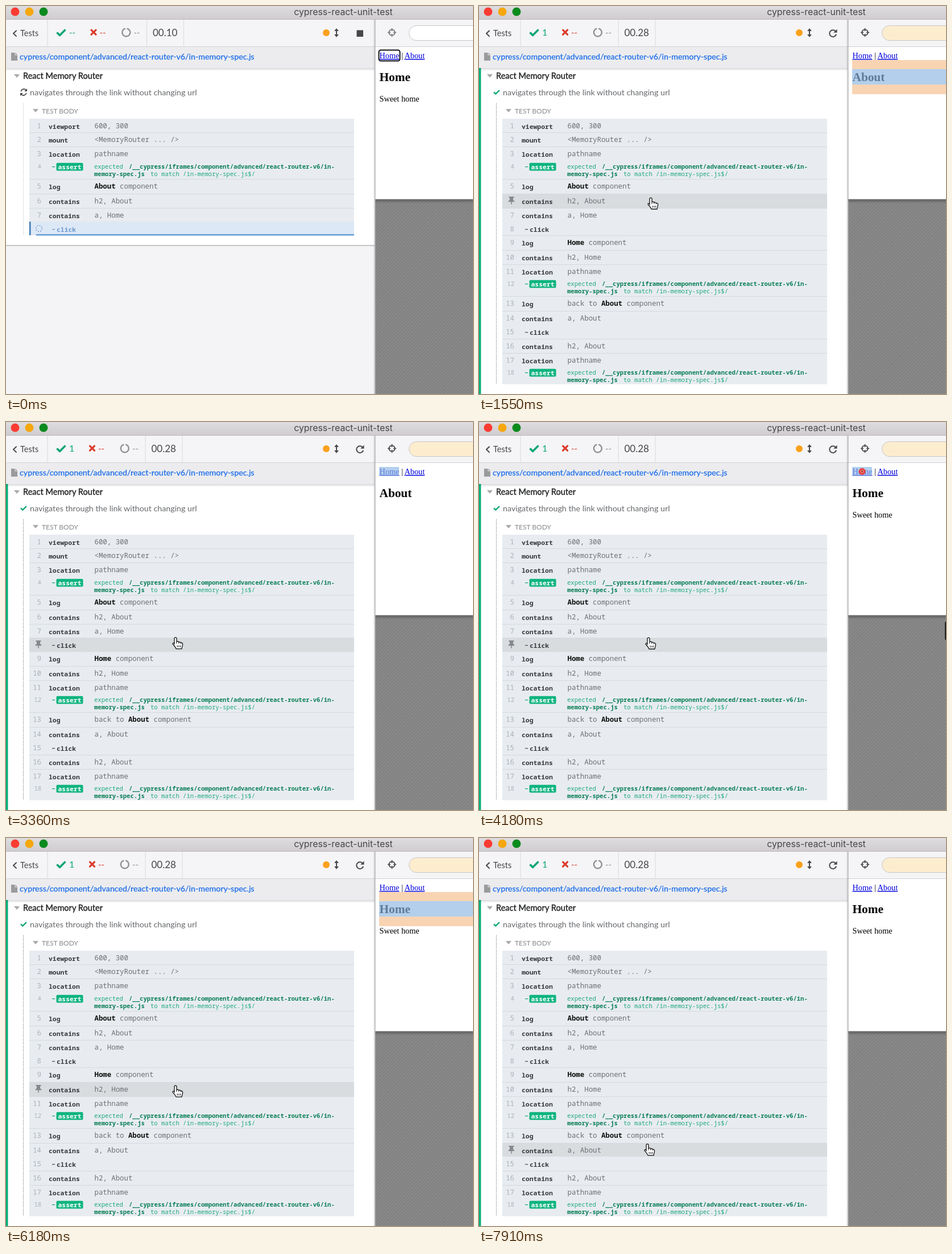
Recreate the animation shown at these times as an HTML page. Size 821 by 682 pixels, loop 8000 ms.

```html
<!DOCTYPE html>
<html lang="en">
<head>
<meta charset="utf-8">
<title>Test runner</title>
<style>
html, body { margin: 0; width: 100%; height: 100%; overflow: hidden; background: #f4f3f5; }
svg { display: block; width: 821px; height: 682px; }
text { white-space: pre; }
.ui { font: 14.25px Lato, sans-serif; }
.mono { font: 12.38px "Noto Sans Mono", "DejaVu Sans Mono", monospace; fill: #6d7074; }
.num { fill: #abb1b8; text-anchor: end; }
.name { font-size: 11.42px; font-weight: 600; fill: #35383c; }
.small { font-size: 10.58px; fill: #1fa97c; }
.strong { font-weight: 600; fill: #0b7f58; }
.key { font-weight: bold; fill: #111; }
.page { font: 14.25px "Liberation Serif", "Times New Roman", serif; fill: #000; }
.link { fill: #0000e0; text-decoration: underline; }
.h2 { font-size: 21.3px; font-weight: bold; }
.line { fill: none; stroke-linecap: round; stroke-linejoin: round; }
</style>
</head>
<body>
<svg viewBox="0 0 821 682">
  <defs>
    <linearGradient id="bar" x2="0" y2="1"><stop stop-color="#dedcde"/><stop offset="1" stop-color="#cfcdd0"/></linearGradient>
    <linearGradient id="fall" x2="0" y2="1"><stop stop-opacity=".28"/><stop offset="1" stop-opacity="0"/></linearGradient>
    <linearGradient id="side"><stop stop-opacity="0"/><stop offset="1" stop-opacity=".12"/></linearGradient>
    <pattern id="hatch" width="4.2" height="4.2" patternUnits="userSpaceOnUse" patternTransform="rotate(45)">
      <rect width="5" height="5" fill="#8a898a"/><rect width="1.6" height="5" fill="#807f80"/>
    </pattern>
  </defs>
  <g id="scene"></g>
  <g id="cursor" fill="#fff" stroke="#111" stroke-width="1.3" stroke-linejoin="round">
    <path d="M-2 2C-2-.6 2-.6 2 2V7.5C4 6.6 5.5 7.3 5.8 8.4C7.5 7.6 9 8.4 9.3 9.5C11 9 12.6 10 12.6 12C12.6 15 11.5 16 11 20H1C0 17-2.5 14.5-4.7 12C-5.8 10-3.5 9-2 11Z"/>
    <path d="M-2 11V13M2 7.5V11M5.8 8.4V11M9.3 9.5V11.5M3.2 14V17.5M6 14V17.5M8.7 14V17.5" fill="none" stroke-width="1"/>
  </g>
</svg>
<script>
const LOOP = 8000, STEP = LOOP / 88;
const GREEN = '#0ca673', RED = '#dc3a2c', DARK = '#45474b', GREY = '#929296';

// top edge, command, message; a leading "-" marks a child command
const rows = [
  [198, 'viewport', '600, 300'], [222, 'mount', '&lt;MemoryRouter ... /&gt;'],
  [247, 'location', 'pathname'], [272, '-assert'],
  [304, 'log', '*About* component'], [330, 'contains', 'h2, About'],
  [355, 'contains', 'a, Home'], [379, '-click'],
  [403, 'log', '*Home* component'], [429, 'contains', 'h2, Home'],
  [454, 'location', 'pathname'], [478, '-assert'],
  [510, 'log', 'back to *About* component'], [536, 'contains', 'a, About'],
  [560, '-click'], [585, 'contains', 'h2, About'],
  [610, 'location', 'pathname'], [634, '-assert'],
];
const END = 665;
const bottomOf = n => n < rows.length ? rows[n][0] : END;

// time, x, y of the fingertip
const path = [
  [620, 328, 690], [1100, 304, 340], [1550, 303, 338], [2250, 303, 341], [2500, 302, 360],
  [2730, 302, 361], [3100, 301, 364], [3280, 299, 379.5], [4180, 299, 380], [4900, 299, 383],
  [5270, 299, 426], [5360, 299, 434], [6500, 299, 437], [7180, 298, 453], [7819, 297, 528],
  [7910, 297, 539], [8000, 297, 545],
];

function pointer(t) {
  const i = path.findIndex(p => p[0] > t);
  if (i < 1) return null;
  const a = path[i - 1], b = path[i], k = (t - a[0]) / (b[0] - a[0]);
  return [a[1] + (b[1] - a[1]) * k, a[2] + (b[2] - a[2]) * k];
}

// number of the command under the pointer, 0 for none
function hoveredAt(t) {
  const p = pointer(t);
  return p && p[1] < END ? rows.filter(r => r[0] <= p[1]).length : 0;
}

const rect = (x, y, w, h, fill, more = '') =>
  `<rect x="${x}" y="${y}" width="${w}" height="${h}" fill="${fill}" ${more}/>`;
const circle = (x, y, r, fill, more = '') =>
  `<circle cx="${x}" cy="${y}" r="${r}" fill="${fill}" ${more}/>`;
const text = (x, y, cls, str, more = '') =>
  `<text x="${x}" y="${y}" class="${cls}" ${more}>${str}</text>`;
const line = (d, color, width, more = '') =>
  `<path class="line" d="${d}" stroke="${color}" stroke-width="${width}" ${more}/>`;
const fillPath = (d, color) => `<path d="${d}" fill="${color}"/>`;
const ui = (x, y, size, color, str, weight = 0) =>
  text(x, y, 'ui', str, `style="font-size:${size}px" fill="${color}" stroke="${color}" stroke-width="${weight}"`);
const tick = (x, y, s, w) => line(`M${x} ${y}l${4 * s} ${4 * s}l${8 * s} ${-8 * s}`, GREEN, w, 'style="stroke-linecap:butt"');

function windowFrame() {
  return rect(0, 0, 821, 682, '#f4f3f5') + rect(0, 0, 821, 23, 'url(#bar)') + rect(0, 23, 821, 1, '#b9b7ba') +
    circle(16, 10, 7.5, '#fa3c32') + circle(41, 10, 7.5, '#f5a70d') + circle(66, 10, 7.5, '#0b8a1e') +
    text(593, 16, '', 'cypress-react-unit-test',
      'text-anchor="middle" fill="#474549" style="font:15.8px Inter,sans-serif"');
}

function toolbar(s) {
  const dx = s.running ? 2.5 : 0;
  return rect(0, 24, 648, 47, '#f5f4f6') + line('M18 43.5l-5 4.8l5 4.8', DARK, 2) +
    ui(25, 53, 14.5, DARK, 'Tests') +
    [72.5, 244.5 + dx, 309.5 + dx].map(x => rect(x, 24, 1, 47, '#d9d8da')).join('') +
    tick(89.5, 46.5, 1.25, 3.6) + ui(111, 52, s.running ? 15 : 16, GREEN, s.running ? '--' : '1') +
    line(`M${147.5 + dx} 42.2l8 8m0-8l-8 8`, RED, 3.2) + ui(162 + dx, 52, 15, RED, '--') +
    line(`M${206.5 + dx} 39.9a7 7 0 1 0 4.6 0`, GREY, 2.3) + ui(222 + dx, 52, 15, GREY, '--') +
    ui(255.5 + dx, 52.5, 17, DARK, s.clock) +
    circle(563, 47, 6, '#fba11b') + line('M581 42v10', DARK, 2) +
    fillPath('M577 44l4-4.8l4 4.8zM577 50l4 4.8l4-4.8z', DARK) +
    (s.running ? rect(616.5, 42.5, 11.5, 11.5, DARK)
      : line('M627 44.5a6 6 0 1 0 .8 6', DARK, 2) + fillPath('M629.5 40.5v6.3h-6.3z', DARK));
}

function specBar() {
  return rect(0, 71, 648, 38, '#ececee') + rect(0, 71, 648, 1, '#d3d2d5') +
    rect(0, 109, 648, 5, 'url(#fall)', 'opacity=".55"') +
    fillPath('M9 82h6.5v4.5h4.5v9.5h-11zM16.5 82l3.5 3.5h-3.5z', '#9a9a9d') +
    ui(24, 94, 14.25, '#1f70ea', 'cypress/component/advanced/react-router-v6/in-memory-spec.js', .3);
}

function assertMessage(top) {
  return text(155, top + 13.5, 'mono small', 'expected') +
    text(216, top + 13.5, 'mono small strong', '/__cypress/iframes/component/advanced/react-router-v6/in-') +
    text(155, top + 27, 'mono small strong', 'memory-spec.js') +
    text(254, top + 27, 'mono small', 'to match /in-memory-spec.js$/');
}

function spinner(y, angle) {
  return `<g transform="translate(58 ${y}) rotate(${angle})">` +
    circle(0, 0, 5.3, 'none', 'stroke="#6f9bd3" stroke-width="1.7" stroke-dasharray="1.8 2.36"') + '</g>';
}

function command(i, s) {
  const [top, label, message] = rows[i], height = bottomOf(i + 1) - top;
  const child = label[0] === '-', name = label.replace('-', ''), isAssert = name === 'assert';
  const busy = s.running && i === s.count - 1, hovered = s.hover === i + 1;
  const base = top + 17.5, color = busy ? 'style="fill:#6b98d2"' : '';
  let out = rect(41, top, 571, height, busy ? '#dde8f6' : hovered ? '#d8dcdf' : '#e8ecf0');
  if (!child && i) out += rect(41, top, 571, 1, '#d5dade');
  if (busy) {
    out += rect(41, top, 2.5, height, '#3b78b5') + rect(53, top + height - 2, 559, 2.5, '#659bd8') +
      spinner(top + 12, s.angle);
  } else if (hovered) {
    out += fillPath(`M52.5 ${top + 5}h9v2h-1.5v4q2.5 1 2.5 3.3h-4.7v4.5h-1.6v-4.5h-4.7q0-2.3 2.5-3.3v-4h-1.5z`, '#85898d');
  } else {
    out += isAssert ? text(62, top + 13.5, 'mono num', i + 1, 'style="font-size:10.5px"')
      : text(62, top + 16.5, 'mono num', i + 1);
  }
  if (child) out += rect(81, isAssert ? top + 10 : top + 13, 5, 1.2, busy ? '#6b98d2' : isAssert ? GREEN : DARK);
  if (isAssert) {
    out += rect(88.5, top + 3.8, 47, 13.6, '#0fb47f', 'rx="2"') +
      text(91.5, top + 14.5, 'mono name', name, 'style="fill:#fff"') + assertMessage(top);
  } else {
    out += text(child ? 89 : 75, base, 'mono name', name, color);
  }
  if (message) out += text(155.5, top + 16.5, 'mono', message.replace(/\*(.+?)\*/, '<tspan class="key">$1</tspan>'));
  return out;
}

function reporter(s) {
  const bottom = bottomOf(s.count);
  const panelEnd = s.running ? bottom + 18 : 682;
  let out = rect(0, 109, 648, panelEnd - 109, '#fff');
  out += s.running ? rect(0, panelEnd - 1, 648, 2, '#c6c5c8') : rect(0, 109, 3.5, 573, '#08b07a');
  out += fillPath('M14 120h10l-5 6zM47 181h10l-5 6z', '#a9a9ac') +
    ui(30, 127.5, 14.55, '#1d1e20', 'React Memory Router', .35) +
    (s.running
      ? line('M26.5 149.5a5 5 0 0 1 8.5-2M35.5 153.5a5 5 0 0 1-8.5 2', DARK, 1.8) +
        fillPath('M37 145v5h-5zM25 158v-5h5z', DARK)
      : tick(26, 151.3, .83, 2.4)) +
    ui(42, 156.5, 14.25, '#66686c', 'navigates through the link without changing url') +
    ui(63, 188.5, 12, '#85878b', 'TEST BODY') +
    line(`M30.5 171V${bottom}`, s.running ? '#c4c4c7' : '#77797d', 1.1, 'style="stroke-linecap:butt" stroke-dasharray="1.2 1.4"');
  for (let i = 0; i < s.count; i++) out += command(i, s);
  return out;
}

function preview(s) {
  const home = s.page === 'Home', [markX, markW] = s.link === 'Home' ? [656, 35] : [701, 36];
  const tint = 'rgba(142,184,227,.67)';
  let out = rect(649, 24, 172, 47, '#f5f4f6') + rect(649, 71, 172, 1, '#cfced1') +
    circle(678.5, 46.5, 5.2, 'none', `stroke="${s.running ? '#77787b' : DARK}" stroke-width="1.8"`) +
    line('M678.5 39.5v4M678.5 49.5v4M671.5 46.5h4M681.5 46.5h4', s.running ? '#77787b' : DARK, 1.6) +
    rect(708.5, 34.5, 140, 26, s.snapshot ? '#fdedcf' : '#fff', 'rx="13" stroke="#c6c5c8"') +
    rect(649, 72, 172, 268, '#fff') + rect(649, 340, 172, 342, 'url(#hatch)') +
    rect(649, 340, 172, 7, 'url(#fall)') + rect(649, 339.5, 172, 1, '#6f6e70');
  if (s.mark === 'h2') out += rect(656, 95, 165, 60, '#f9d4b2') + rect(656, 111, 165, 27, '#fff');
  out += text(656.5, 92, 'page', '<tspan class="link">Home</tspan> | <tspan class="link">About</tspan>') +
    text(656.5, 131.6, 'page h2', s.page) + (home ? text(656.5, 168, 'page', 'Sweet home') : '');
  if (s.mark === 'h2') out += rect(656, 111, 165, 27, tint);
  if (s.mark === 'a') out += rect(markX, 79, markW, 16, tint);
  if (s.ring) {
    const [x, w] = s.ring === 'Home' ? [655.5, 37] : [700, 38];
    out += rect(x, 77.5, w, 19, 'none', 'rx="3.5" stroke="#101018" stroke-width="2"');
  }
  if (s.clicked) {
    const x = markX + markW / 2;
    out += circle(x, 87, 6, '#e8413c') + circle(x, 87, 2.4, '#c02a2a', 'stroke="#f3b5b5" stroke-width="1"') +
      rect(819, 350, 30, 34, '#1c1c1e', 'rx="4"');
  }
  return out + rect(645, 24, 3, 658, 'url(#side)') + rect(648, 24, 1.5, 658, '#b5b4b7');
}

function snapshotOf(n, t) {
  const after = Math.floor((t - 3200) / 800) % 2 === 1;
  const s = { snapshot: true, ring: '' };
  s.page = n === 8 ? (after ? 'Home' : 'About') : n === 15 ? (after ? 'About' : 'Home') : n > 8 && n < 15 ? 'Home' : 'About';
  s.mark = [6, 10, 16].includes(n) ? 'h2' : [7, 8, 14, 15].includes(n) ? 'a' : '';
  s.link = n < 9 ? 'Home' : 'About';
  s.clicked = n === 8 || n === 15;
  return s;
}

function stateAt(t) {
  if (t < STEP - 8) return { running: true, count: 8, clock: '00.10', page: 'Home', ring: 'Home', angle: t };
  if (t < 2 * STEP - 8) return { running: true, count: 15, clock: '00.19', page: 'Home', ring: 'About', angle: t };
  const shown = hoveredAt(t - STEP); // the preview follows the pointer one step late
  return { count: 18, clock: '00.28', page: 'About', ring: 'About', hover: hoveredAt(t),
    ...(shown ? snapshotOf(shown, t) : {}) };
}

const scene = document.getElementById('scene'), cursor = document.getElementById('cursor');
let drawn = '';

function tickFrame() {
  const now = performance.now() % LOOP;
  const t = Math.floor((now + 8) / STEP) * STEP % LOOP;
  const state = stateAt(t), key = JSON.stringify(state), p = pointer(t);
  if (key !== drawn) {
    scene.innerHTML = windowFrame() + reporter(state) + toolbar(state) + specBar() + preview(state);
    drawn = key;
  }
  cursor.setAttribute('transform', p ? `translate(${p[0] - 1} ${p[1] - 1})` : 'translate(0 -99)');
  requestAnimationFrame(tickFrame);
}
tickFrame();
</script>
</body>
</html>
```
